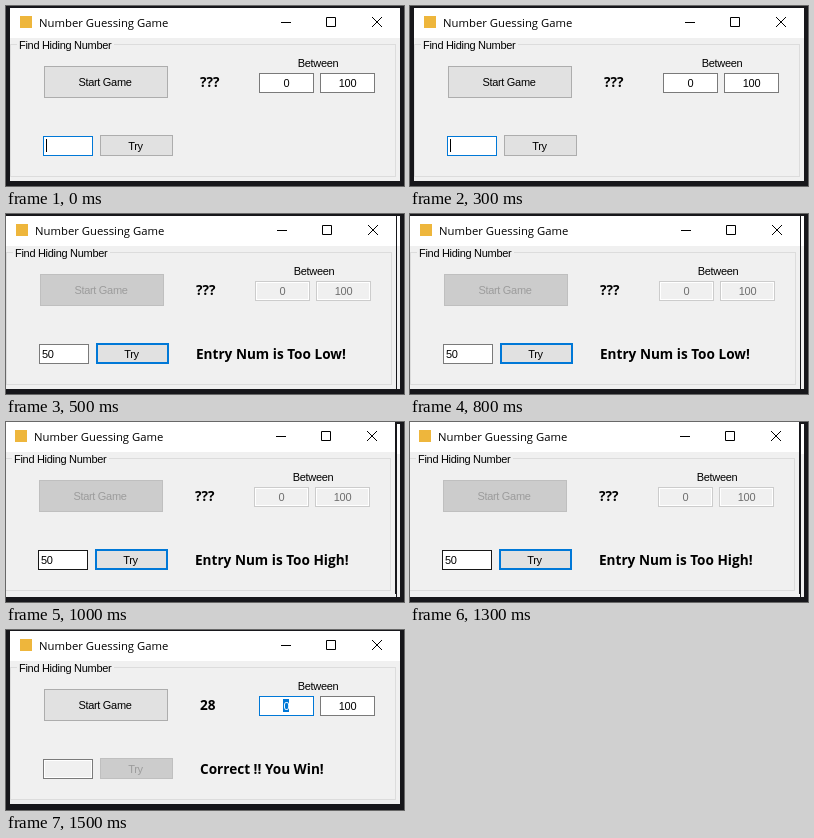
An HTML page with a canvas for the animation above (2 s loop, 398x180 px).

```html
<!DOCTYPE html>
<html lang="en">
<head>
<meta charset="utf-8">
<title>Number Guessing Game</title>
<style>
  html, body { margin: 0; width: 100%; height: 100%; overflow: hidden; background: #17171b; }
  canvas { display: block; }
</style>
</head>
<body>
<canvas width="398" height="180"></canvas>
<script>
const ctx = document.querySelector('canvas').getContext('2d');
const DARK = '#17171b', FACE = '#f0f0f0', BLUE = '#0078d7', GRAY = '#7a7a7a';
const UI = '11px "Liberation Sans", Arial, sans-serif';
const TITLE = '11.3px "Open Sans", sans-serif';
const BOLD = 'bold 13.6px "Open Sans", sans-serif';
const STEP = 500;

// dx, dy: window shift; playing: a round is running
const states = [
  { dx: 0, dy: 0, number: '???', message: '', entry: '', entryEdge: BLUE, caret: true, canTry: true },
  { dx: -4, dy: 0, number: '???', message: 'Entry Num is Too Low!', entry: '50', entryEdge: GRAY, playing: true, canTry: true },
  { dx: -5, dy: -2, number: '???', message: 'Entry Num is Too High!', entry: '50', entryEdge: '#171717', playing: true, canTry: true },
  { dx: 0, dy: -1, number: '28', message: 'Correct !! You Win!', entry: '', entryEdge: GRAY, selected: true },
];

function fill(x, y, w, h, color) {
  ctx.fillStyle = color;
  ctx.fillRect(x, y, w, h);
}

function box(x, y, w, h, face, edge, line = 1) {
  fill(x, y, w, h, edge);
  fill(x + line, y + line, w - 2 * line, h - 2 * line, face);
}

function text(label, x, y, font = UI, color = '#000', align = 'left') {
  ctx.font = font;
  ctx.letterSpacing = font === UI ? '-0.3px' : '0px';
  ctx.fillStyle = color;
  ctx.textAlign = align;
  ctx.fillText(label, x, y);
}

function button(label, x, y, w, h, enabled, focused) {
  const edge = focused ? BLUE : enabled ? '#adadad' : '#bfbfbf';
  box(x, y, w, h, enabled ? '#e1e1e1' : '#cccccc', edge, focused ? 2 : 1);
  text(label, x + w / 2 - 1, y + h / 2 + 4, UI, enabled ? '#000' : '#9c9c9c', 'center');
}

// A disabled field keeps a white rim inside its edge
function field(x, y, w, h, enabled, edge) {
  box(x, y, w, h, '#fff', edge);
  if (!enabled) fill(x + 2, y + 2, w - 4, h - 4, FACE);
}

function limit(label, x, enabled, selected) {
  field(x, 67, 55, 20, enabled, selected ? BLUE : enabled ? GRAY : '#cccccc');
  if (selected) fill(x + 24, 70, 6, 13, BLUE);
  text(label, x + 27.5, 81, UI, selected ? '#fff' : enabled ? '#000' : '#6d6d6d', 'center');
}

function panes(x, y) {
  fill(x, y, 390, 30, '#fff');
  fill(x, y + 30, 390, 143, FACE);
}

function titleBar() {
  fill(14, 10, 12, 12, '#eeb63c');
  text('Number Guessing Game', 33, 21, TITLE);
  ctx.strokeStyle = '#000';
  ctx.lineWidth = 1;
  ctx.beginPath();
  ctx.moveTo(275, 16.5);
  ctx.lineTo(285, 16.5);
  ctx.rect(320.5, 11.5, 9, 9);
  ctx.moveTo(366, 11);
  ctx.lineTo(376, 21);
  ctx.moveTo(376, 11);
  ctx.lineTo(366, 21);
  ctx.stroke();
}

function draw(s) {
  ctx.setTransform(1, 0, 0, 1, 0, 0);
  fill(0, 0, 398, 180, DARK);
  if (s.playing) {
    // a sliver of the unshifted window stays visible at the right and bottom
    panes(4, 2);
    fill(0, 172, 390, 3, FACE);
    fill(394 + s.dx, 2, -3 - s.dx, 170, DARK);
    fill(390, 2, 1, 173, DARK);
  }
  ctx.translate(s.dx, s.dy);
  panes(4, 2);
  titleBar();

  box(4, 38, 386, 133, FACE, '#dcdcdc');
  fill(11, 37, 97, 3, FACE);
  text('Find Hiding Number', 13, 43);

  button('Start Game', 38, 60, 124, 32, !s.playing);
  text(s.number, 194, 81, BOLD);
  text('Between', 312, 61, UI, '#000', 'center');
  limit('0', 253, !s.playing, s.selected);
  limit('100', 314, !s.playing);

  field(37, 130, 50, 20, s.canTry, s.entryEdge);
  text(s.entry, 40, 144);
  if (s.caret) fill(40, 133, 1, 13, '#000');
  button('Try', 94, 129, 73, 21, s.canTry, s.playing);
  text(s.message, 194, 145, BOLD);
}

function tick() {
  draw(states[Math.floor(performance.now() / STEP) % states.length]);
  requestAnimationFrame(tick);
}
tick();
</script>
</body>
</html>
```
